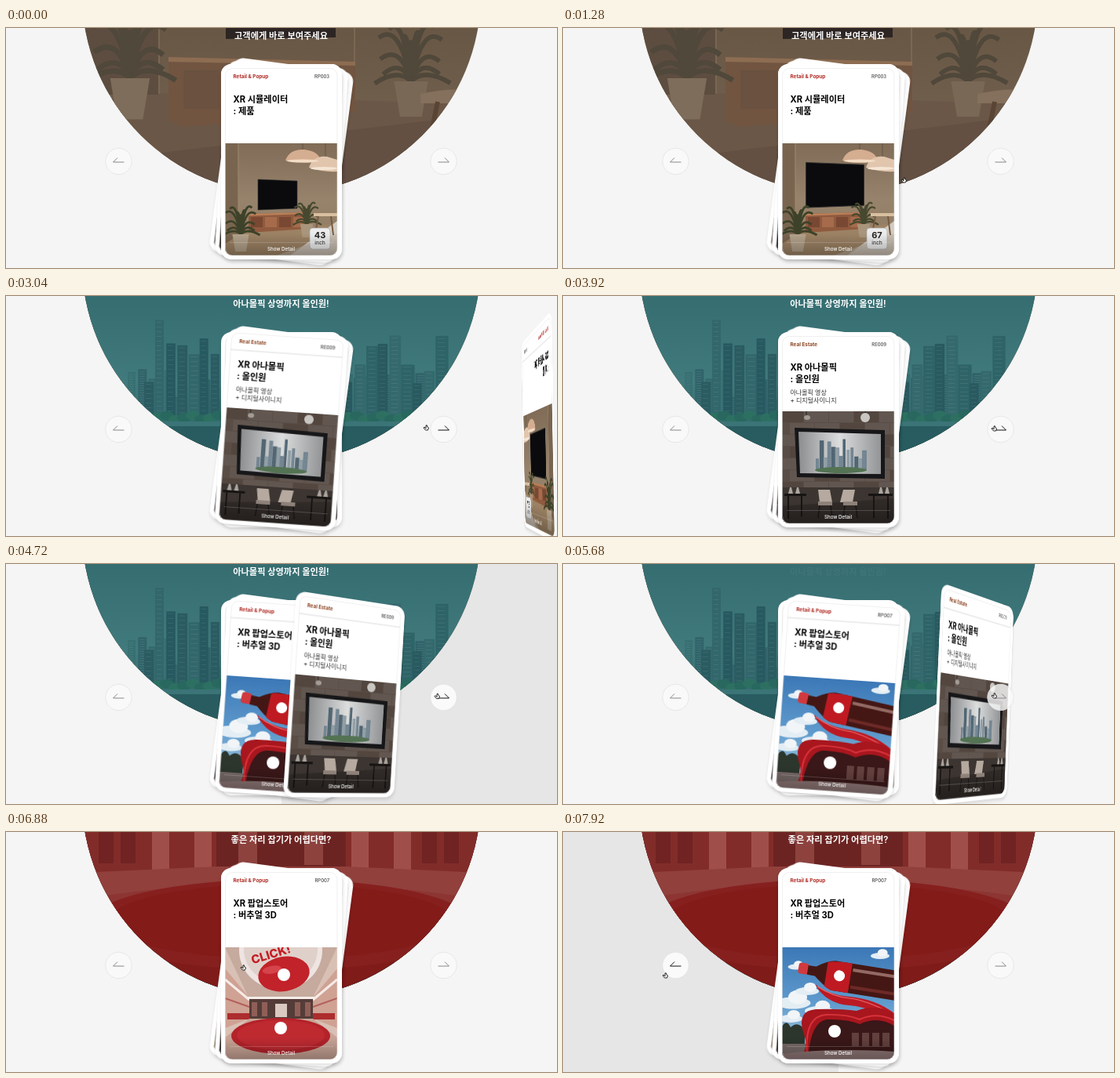
These frames come from a looping animation (702x306 px, 8 s). An HTML page:

```html
<!DOCTYPE html>
<html lang="ko">
<head>
<meta charset="utf-8">
<title>XR card stack</title>
<style>
  html, body { margin: 0; width: 100%; height: 100%; overflow: hidden; background: #f5f5f5; }
  #stage { position: relative; width: 702px; height: 306px; overflow: hidden; }
  svg { position: absolute; left: 0; top: 0; }
  text { font-family: Inter, "Noto Sans CJK KR", "Noto Sans CJK", sans-serif; }
  .card { left: 274px; top: 46px; overflow: visible; filter: drop-shadow(1px 3px 2px rgba(0,0,0,.11)); }
  .mid { text-anchor: middle; }
  #overlay { z-index: 200; }
</style>
</head>
<body>
<div id="stage"></div>
<script>
const LOOP = 8000, PEEK_X = 82, FLY_X = 250, OUT_MS = 480, BACK_MS = 420;
const flights = [{ peek: 1950, at: 2654 }, { peek: 3950, at: 5490 }];
const slotTilt = [0, 4, 7.6, 0, 0];

const clamp = v => Math.max(0, Math.min(1, v));
const smooth = v => { v = clamp(v); return v * v * (3 - 2 * v); };
const sine = v => (1 - Math.cos(Math.PI * clamp(v))) / 2;
const easeOut = v => 1 - (1 - clamp(v)) ** 3;
const lerp = (a, b, k) => a + (b - a) * k;

// SVG helpers
const rect = (x, y, w, h, fill, more = '') => `<rect x="${x}" y="${y}" width="${w}" height="${h}" fill="${fill}" ${more}/>`;
const oval = (x, y, rx, ry, fill, more = '') => `<ellipse cx="${x}" cy="${y}" rx="${rx}" ry="${ry}" fill="${fill}" ${more}/>`;
const path = (d, fill, more = '') => `<path d="${d}" fill="${fill}" ${more}/>`;
const line = (d, stroke, width, more = '') => path(d, 'none', `stroke="${stroke}" stroke-width="${width}" ${more}`);
const label = (x, y, size, weight, fill, str, more = '') =>
  `<text x="${x}" y="${y}" font-size="${size}" font-weight="${weight}" fill="${fill}" ${more}>${str}</text>`;
const gradient = (id, stops, more = 'x2="0" y2="1"') =>
  `<linearGradient id="${id}" ${more}>${stops.map((c, i) =>
    `<stop offset="${i / (stops.length - 1)}" stop-color="${c}"/>`).join('')}</linearGradient>`;

function random(seed) {
  return () => (seed = (seed * 16807) % 2147483647) / 2147483647;
}

function towers(x0, x1, base, height, count, colors, seed) {
  const rnd = random(seed), step = (x1 - x0) / count;
  let out = '';
  for (let i = 0; i < count; i++) {
    const h = height * (.35 + .65 * rnd()), w = step * (.7 + .5 * rnd()), x = x0 + i * step;
    out += rect(x, base - h, w, h, colors[i % colors.length]);
    for (let y = base - h + 3; y < base - 3; y += Math.max(2.5, height / 22))
      out += rect(x + w * .15, y, w * .6, .6, '#fff', 'opacity=".13"');
  }
  return out;
}

function plant(x, y, size, leaf, pot) {
  let out = '';
  for (let i = 0; i < 13; i++) {
    const a = -Math.PI * (.03 + .94 * i / 12), r = size * (.8 + .2 * Math.sin(i * 5));
    const ex = x + Math.cos(a) * r * .7, ey = y + Math.sin(a) * r;
    out += line(`M${x} ${y}Q${x + Math.cos(a) * r * .25} ${ey - size * .12} ${ex} ${ey + size * .1}`, leaf, size * .065);
  }
  const w = size * .24;
  return out + path(`M${x - w} ${y}h${2 * w}l${-w * .35} ${size * .5}h${-w * 1.3}z`, pot);
}

// Card pictures fill x 279..422, y 147..290
const room = () => rect(279, 147, 143, 143, 'url(#wall)')
  + path('M279 147h17v118l-17 10z', '#79654f') + line('M296 147V262', '#a08a70', 1)
  + path('M279 275L310 256L422 250V290H279z', '#9c8264')
  + path('M362 290L422 246V290z', '#d3cbc0') + path('M345 290L422 262V290z', '#c2b5a5', 'opacity=".6"')
  + path('M309 237L385 235V256L309 261z', '#8f5a3e')
  + [0, 1, 2, 3].map(i => rect(312 + i * 18, 241, 15, 13, i % 2 ? '#a56b4b' : '#794832')).join('')
  + path('M309 237L385 235V237L309 239.500z', '#bc8058')
  + `<g class="tv">${path('M321 193L371 195V230L321 232z', '#0b0b0d', 'stroke="#333" stroke-width=".6"')}</g>`
  + plant(299, 263, 44, '#3d4229', '#b3a28b') + plant(383, 250, 34, '#46482f', '#a9957b')
  + path('M392 236h30v4h-30z', '#d8bf9f') + line('M398 240L394 262M414 240L417 264', '#765a40', 2)
  + line('M378 147V157M407 147V165', '#5b4b3d', .7)
  + path('M356 169Q361 154 380 155Q399 157 401 170Q378 174 356 169z', '#d5ad90')
  + path('M386 178Q391 162 409 164L422 168V183Q403 184 386 178z', '#e1c5ad')
  + oval(378, 169.500, 20, 2, '#f3dcc4') + oval(405, 179, 17, 2, '#f5e5d4')
  + rect(387, 255, 26, 27, '#ececec', 'rx="4" stroke="#aaa" stroke-width=".7"')
  + label(400, 268, 11, 700, '#222', '43', 'class="mid size"') + label(400, 276, 6.600, 600, '#444', 'inch', 'class="mid"');

const gallery = () => {
  let out = rect(279, 147, 143, 143, '#594d46');
  for (let r = 0; r < 7; r++)
    for (let c = 0; c < 5; c++)
      out += rect(275 + c * 32 + r % 2 * 14, 147 + r * 15, 31, 14, (r + c) % 3 ? '#625750' : '#52463f');
  return out + path('M295 168L410 171V233L298 231z', '#171719')
    + path('M300 173L405 176V227L302 226z', 'url(#screen)')
    + towers(322, 386, 222, 42, 13, ['#718390', '#4d626f', '#8e9ca3'], 17)
    + oval(354, 222, 33, 4, '#537353')
    + path('M279 244H422V290H279z', '#3c3531') + path('M279 268L422 258V290H279z', '#312b28')
    + rect(282, 252, 28, 3, '#171514') + rect(389, 252, 31, 3, '#171514')
    + line('M287 255V284M304 255V281M396 255V283M414 255V284', '#171514', 2)
    + [[333, 1], [365, -1]].map(([x, d]) =>
        path(`M${x - 8} 247h15l${d * 3} 16h-16z`, '#b6aaa0') + rect(x - 8, 262, 18, 5, '#90847c')
        + line(`M${x - 6} 267l-2 16M${x + 8} 267l2 16`, '#191716', 1.500)).join('')
    + [287, 296, 402, 410].map(x => path(`M${x} 252l2-8h2l2 8z`, '#d0cbc5', 'opacity=".75"')).join('')
    + line('M310 147v7M385 147v6', '#222', 1) + oval(385, 155, 6, 6, '#c9c6c2') + oval(311, 155, 4, 3, '#a29c95');
};

const bottle = () => {
  const cloud = (x, y, s) => oval(x, y, 15 * s, 5 * s, '#e3edf4') + oval(x + 4 * s, y - 5 * s, 8 * s, 6 * s, '#f1f5f8');
  return rect(279, 147, 143, 143, 'url(#sky)')
    + cloud(297, 172, .7) + cloud(293, 218, 1.500) + cloud(311, 203, 1) + cloud(404, 158, .8) + cloud(326, 228, 1.200) + cloud(290, 238, 1)
    + path('M279 248Q285 238 290 249Q299 240 308 252V275H279z', '#2c362d')
    + rect(279, 270, 143, 20, '#786a68')
    + '<g transform="translate(0 -10) rotate(9 306 184)">'
    + rect(300, 177, 13, 14, '#d0393e', 'rx="3"')
    + path('M312 179H322Q334 170 345 168H427V206H345Q334 201 322 191H312z', '#451714')
    + path('M336 171Q345 168 367 168V206H345Q339 204 336 202z', '#bf1a22')
    + path('M369 174H427V178H369z', '#936a63') + path('M369 196H427V200H369z', '#6d2a27')
    + oval(353, 186, 7, 7, '#fff') + '</g>'
    + path('M321 194Q339 208 365 210Q398 213 422 231V245Q398 224 365 221Q335 219 321 194z', '#bb1a23')
    + line('M324 197Q344 210 365 212T422 233', '#ee6a6e', 1.200)
    + path('M296 290Q316 280 306 255Q298 228 322 226Q352 225 374 228Q402 218 422 232V290z', '#a8161e')
    + path('M313 281Q317 242 336 239Q362 238 378 245Q401 234 422 247V283z', '#3a1718')
    + line('M311 284Q307 235 335 233Q362 232 378 239Q399 229 422 240', '#d6333a', 2)
    + [368, 381, 394, 407].map(x => rect(x, 256, 9, 17, '#62403e')).join('')
    + path('M279 283Q340 275 422 280V290H279z', '#8e7776') + oval(346, 254, 8, 8, '#fff');
};

const hall = () => rect(279, 147, 143, 143, '#d9c0b4')
  + path('M279 147H422L391 211H309z', '#c5aa9d')
  + path('M279 174L310 211V238L279 250z', '#cfa294') + path('M422 174L391 211V238L422 250z', '#cfa294')
  + line('M279 188L310 214M422 188L391 214', '#f5ebe6', 3)
  + line('M279 212L310 223M422 212L391 223', '#b4605a', 2)
  + rect(310, 212, 81, 26, '#543c38')
  + [313, 326, 368, 381].map(x => rect(x, 217, 7, 18, '#8f5f57')).join('') + rect(343, 219, 15, 17, '#d9c9c0')
  + rect(308, 210, 85, 3, '#f6ede8') + rect(282, 231, 28, 8, '#ad2c2e') + rect(391, 231, 28, 8, '#ad2c2e')
  + path('M310 238H391L422 262V290H279V262z', '#c9a496')
  + oval(350, 151, 53, 50, '#eee4e1') + oval(350, 150, 47, 43, '#e0d0ca')
  + `<g transform="rotate(-10 354 181)">${oval(354, 181, 33, 22, '#c2222a') + oval(340, 173, 12, 5, '#d4444a')}</g>`
  + oval(354, 182, 8, 8, '#fff')
  + label(339, 161, 15, 800, '#c51c24', 'CLICK!', 'class="mid" transform="rotate(-17 339 161)"')
  + oval(350, 260, 63, 23, '#b4222a') + oval(350, 259, 56, 19, '#bf2a31') + oval(350, 250, 8, 8, '#fff');

// Circle backdrops
const roomBack = () => rect(95, 0, 512, 220, 'url(#roomTint)')
  + path('M95 95L200 83L607 98V220H95z', '#6b5747') + path('M190 160L607 110V220H180z', '#635043')
  + rect(95, 0, 100, 85, '#5d4d40') + line('M195 0V84M444 0V75', '#7a6753', 2)
  + path('M280 0H420V12L280 14z', '#2c2523')
  + path('M207 37L445 43V108L225 126L207 118z', '#715541') + path('M207 37L445 43V48L207 43z', '#8d6d52')
  + [0, 1, 2, 3].map(i => rect(226 + i * 53, 54, 46, 49, i % 2 ? '#78604c' : '#6a5140')).join('')
  + plant(158, 64, 105, '#50483a', '#7e6d5a') + plant(516, 68, 90, '#50483a', '#7a6856')
  + path('M528 84Q570 74 607 82V96H528z', '#84705c') + line('M550 94L541 138M585 94L589 150', '#5a4434', 6);

const cityBack = () => rect(95, 0, 512, 220, 'url(#cityTint)')
  + towers(103, 600, 155, 66, 38, ['#34696d', '#376f72', '#30646a'], 91)
  + towers(176, 275, 155, 130, 7, ['#2a5c62', '#32676c', '#265960'], 33)
  + towers(415, 562, 155, 115, 10, ['#2e6468', '#285a60', '#34696d'], 57)
  + Array.from({ length: 46 }, (_, i) => oval(106 + i * 11, 155 + 3 * Math.sin(i * 2), 9, 6, i % 2 ? '#28685e' : '#2d7062')).join('')
  + rect(95, 160, 512, 6, '#3b7477') + rect(95, 166, 512, 54, '#285c60');

const hallBack = () => rect(95, 0, 512, 220, '#7f1b19')
  + rect(95, 0, 512, 74, '#822c2a')
  + [186, 240, 440, 494].map(x => rect(x, 0, 22, 56, '#a04e4a')).join('')
  + [118, 146, 530, 558].map(x => rect(x, 0, 19, 40, '#702322')).join('')
  + rect(268, 0, 165, 46, '#6c2422') + [296, 380].map(x => rect(x, 0, 24, 42, '#8d423e')).join('')
  + path('M95 52L268 44H433L607 52V110H95z', '#91403c') + path('M95 86Q350 44 607 86V130H95z', '#8c3532')
  + oval(350, 118, 246, 58, '#86201e') + oval(350, 114, 220, 48, '#831b19') + oval(350, 101, 28, 28, '#a14843');

const RED = '#b02a24', BROWN = '#8c4523';
const cards = [
  { kind: 'Retail &amp; Popup', ink: RED, code: 'RP003', title: ['XR 시뮬레이터', ': 제품'], art: room() },
  { kind: 'Real Estate', ink: BROWN, code: 'RE009', title: ['XR 아나몰픽', ': 올인원'], sub: ['아나몰픽 영상', '+ 디지털사이니지'], art: gallery() },
  { kind: 'Retail &amp; Popup', ink: RED, code: 'RP007', title: ['XR 팝업스토어', ': 버추얼 3D'],
    art: `<g class="bottle">${bottle()}</g><g class="hall">${hall()}</g>` },
  { kind: 'Real Estate', ink: BROWN, code: 'RE008', title: ['XR 아나몰픽', ': 영상'], art: gallery() }
];
const backs = [
  { text: '고객에게 바로 보여주세요', art: roomBack() },
  { text: '아나몰픽 상영까지 올인원!', art: cityBack() },
  { text: '좋은 자리 잡기가 어렵다면?', art: hallBack() }
];

const cardSvg = c => `<svg class="card" width="154" height="249" viewBox="274 46 154 249">`
  + rect(274, 46, 154, 249, '#fff', 'rx="13"')
  + `<g clip-path="url(#inner)">${c.art}${rect(279, 262, 143, 28, 'url(#shade)')}</g>`
  + line('M285 273.500H417', '#fff', .5, 'opacity=".35"')
  + rect(279.500, 51.500, 142.500, 238.500, 'none', 'rx="9" stroke="#e6e6e6" stroke-width=".6"')
  + line('M279.500 73H422', '#ccc', .7, 'class="rule"')
  + label(289.500, 64.200, 6.400, 700, c.ink, c.kind) + label(412, 64.200, 5.900, 500, '#444', c.code, 'text-anchor="end"')
  + c.title.map((s, i) => label(289.500, 95 + i * 15, 11.200, 700, '#000', s)).join('')
  + (c.sub || []).map((s, i) => label(289.500, 125.800 + i * 10.500, 8, 500, '#333', s)).join('')
  + label(350.500, 283.700, 6.200, 500, '#fff', 'Show Detail', 'class="mid"') + '</svg>';

const button = (id, x, dir) => `<g id="${id}">`
  + oval(x, 170, 16.700, 16.700, '#fafafa', 'fill-opacity=".8" stroke="#e2e2e2" stroke-width=".8"')
  + line(`M${x - 7 * dir} 171H${x + 7 * dir}L${x + 1.500 * dir} 165.500`, '#888', 1, 'class="arrow"') + '</g>';

const stage = document.getElementById('stage');
stage.innerHTML = `<svg width="702" height="306"><defs>
  <clipPath id="disc"><circle cx="351" cy="-43" r="254"/></clipPath>
  <clipPath id="inner"><path d="M279 147H422V281a9 9 0 0 1-9 9H288a9 9 0 0 1-9-9z"/></clipPath>`
  + gradient('wall', ['#806c57', '#97836c', '#8f795f']) + gradient('sky', ['#3c78b6', '#5f9bcd', '#b8d3e5'])
  + gradient('screen', ['#8c8d8f', '#dcdddd', '#929496'], 'x2="1" y2="0"')
  + gradient('shade', ['rgba(0,0,0,0)', 'rgba(0,0,0,.28)'])
  + gradient('roomTint', ['#695745', '#715f4d', '#574539']) + gradient('cityTint', ['#356d71', '#417a7d', '#27595d'])
  + '</defs>' + rect(0, 0, 351, 306, '#e6e6e6', 'id="leftHalf"') + rect(351, 0, 351, 306, '#e6e6e6', 'id="rightHalf"')
  + `<g clip-path="url(#disc)">${backs.map(b => `<g class="back">${b.art}</g>`).join('')}</g>`
  + backs.map(b => label(350.500, 14, 11.200, 600, '#fff', b.text, 'class="mid head"')).join('') + '</svg>'
  + cards.map(cardSvg).join('')
  + `<svg id="overlay" width="702" height="306">${button('prev', 143.500, -1)}${button('next', 557.500, 1)}<g id="cursor">`
  + path('M-3 0L-2-1L0 1V-3L1.200-3.300L2-1L3.500 0L2.500 3H-.5z', '#fff', 'stroke="#111" stroke-width=".9"') + '</g></svg>';

const all = sel => [...stage.querySelectorAll(sel)];
const one = sel => stage.querySelector(sel);
const cardEls = all('.card'), backEls = all('.back'), headEls = all('.head'), rules = all('.rule');
const tv = one('.tv'), size = one('.size'), bottleEl = one('.bottle'), hallEl = one('.hall'), cursor = one('#cursor');

const cursorPath = [[1100, 424, 206], [1280, 434, 194], [1900, 545, 172], [3040, 535, 168], [3900, 549, 169],
  [5900, 549, 168], [6700, 302, 173], [7000, 302, 173], [7800, 130, 183], [8000, 130, 183]];

function placeCard(el, i, t) {
  const shift = flights.reduce((sum, f) => sum + smooth((t - f.at - OUT_MS) / BACK_MS), 0);
  const f = flights[i];
  const gone = f && t >= f.at + OUT_MS;
  const slot = i - shift + (gone ? 4 : 0);
  const low = Math.min(3, Math.floor(slot));
  let x = 0, tilt = lerp(slotTilt[low], slotTilt[low + 1], slot - low);
  if (f) {
    const stay = 1 - smooth((t - f.at - OUT_MS) / BACK_MS);
    const peek = easeOut((t - f.peek) / 450);
    x = (PEEK_X * peek + FLY_X * sine((t - f.at) / OUT_MS)) * stay;
    tilt += 4 * peek * stay;
  }
  const z = 30 * smooth((x - 40) / 110);
  el.style.transform = `perspective(640px) translate3d(${x}px,0,${z}px) rotateY(${x / 4.1}deg) rotateZ(${tilt}deg)`;
  el.style.zIndex = 100 - Math.round(slot * 10);
  rules[i].style.opacity = clamp(tilt / 4);
}

function hover(side, half, grey, dark) {
  one(half).style.opacity = grey;
  one(`${side} .arrow`).style.stroke = dark ? '#111' : '#888';
  one(`${side} ellipse`).style.fill = grey > .5 ? '#fff' : '#fafafa';
}

function draw(t) {
  cardEls.forEach((el, i) => placeCard(el, i, t));

  backEls.forEach((el, i) => {
    const enter = flights[i - 1], leave = flights[i];
    el.style.opacity = enter ? clamp((t - enter.at - 200) / 180) : 1;
    const shown = enter ? clamp((t - enter.at - 210) / 160) : 1;
    const kept = leave ? 1 - clamp((t - leave.at) / 200) : 1;
    headEls[i].style.opacity = shown * kept;
  });

  const grey = flights.reduce((sum, f) => sum + clamp((t - f.peek) / 150) * (1 - clamp((t - f.at) / 120)), 0);
  hover('#next', '#rightHalf', grey, t > 1900 && t < 5640);
  hover('#prev', '#leftHalf', clamp((t - 7650) / 150), t > 7650);

  const inches = t < 400 ? 43 : t < 800 ? 55 : 67;
  const scale = 1 + .24 * (smooth((t - 400) / 150) + smooth((t - 800) / 150));
  size.textContent = inches;
  tv.setAttribute('transform', `translate(345 238) scale(${scale}) translate(-345 -238)`);

  const inside = t >= 6400 && t < 7440;
  bottleEl.style.display = inside ? 'none' : '';
  hallEl.style.display = inside ? '' : 'none';

  cursor.style.display = t < cursorPath[0][0] ? 'none' : '';
  const n = Math.max(1, cursorPath.findIndex(p => p[0] > t));
  const [t0, x0, y0] = cursorPath[n - 1], [t1, x1, y1] = cursorPath[n];
  const k = smooth((t - t0) / (t1 - t0));
  cursor.setAttribute('transform', `translate(${lerp(x0, x1, k)} ${lerp(y0, y1, k)})`);
}

const start = performance.now();
function tick() {
  draw((performance.now() - start) % LOOP);
  requestAnimationFrame(tick);
}
tick();
</script>
</body>
</html>
```
